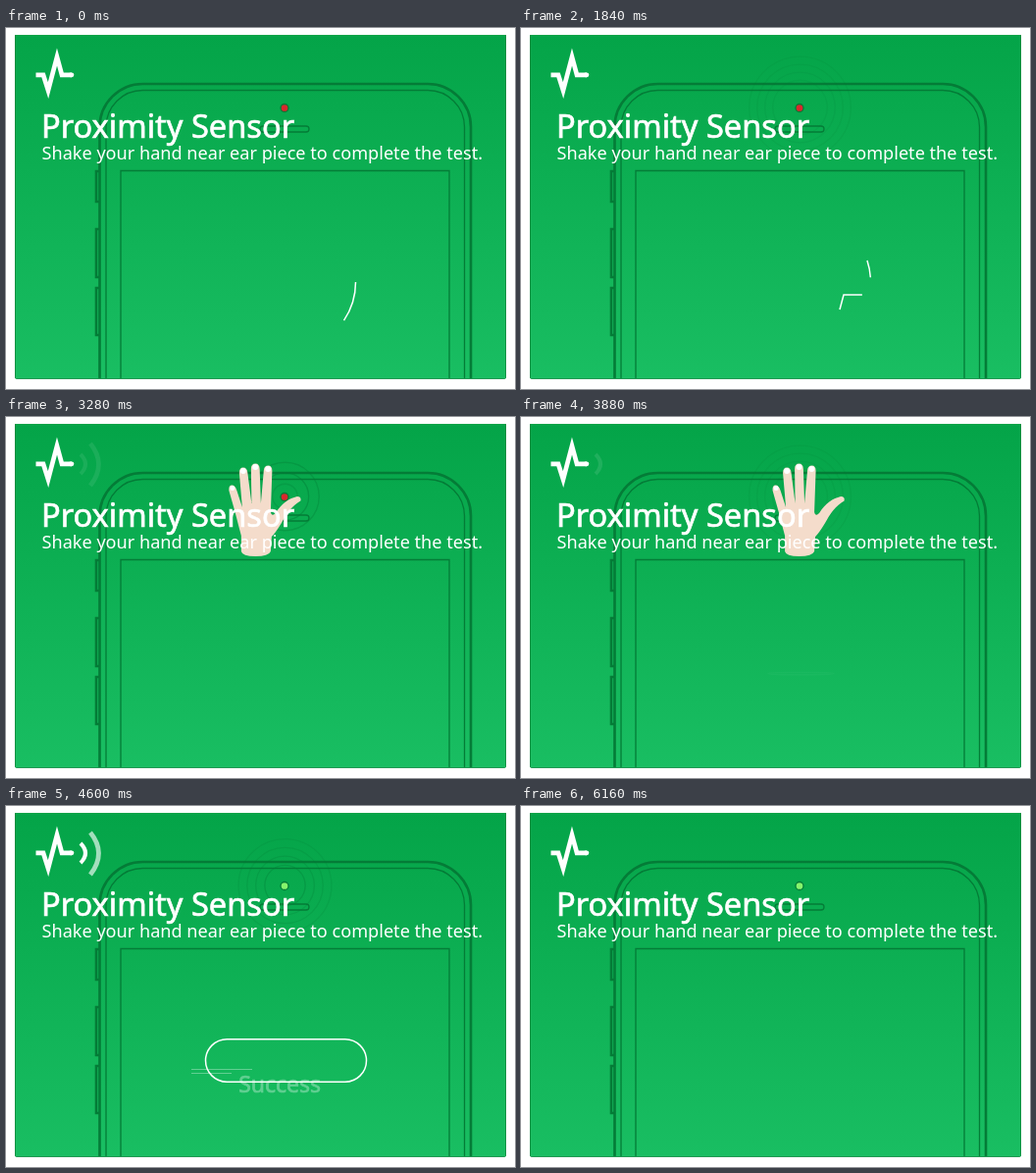
These frames come from a looping animation (519 by 368 pixels, 6.24 s). An HTML page:

```html
<!DOCTYPE html>
<html lang="en">
<head>
<meta charset="utf-8">
<title>Proximity Sensor</title>
<style>
  html, body { margin: 0; width: 100%; height: 100%; overflow: hidden; background: #fff; }
  svg { display: block; width: 519px; height: 368px; }
  text { font-family: "Noto Sans", "Open Sans", sans-serif; fill: #fff; }
  .medium { stroke: #fff; stroke-width: .7; }
  .line { fill: none; stroke: #fff; stroke-width: 1.5; }
  .phone { fill: none; stroke: #047c37; stroke-width: 1.3; }
  .phone .bold { stroke-width: 2.6; }
</style>
</head>
<body>
<svg viewBox="0 0 519 368">
  <defs>
    <linearGradient id="green" x2="0" y2="1">
      <stop stop-color="#04a448"/>
      <stop offset="1" stop-color="#19be62"/>
    </linearGradient>
  </defs>
  <rect x="9" y="7" width="501" height="350.5" rx="1" fill="url(#green)"/>
  <path d="M9.5 7V356.5L10.5 357.5H508.5L509.5 356.5V7" fill="none" stroke="#07873c" stroke-width=".8"/>

  <g class="phone">
    <path class="bold" d="M95.5 357V101A44 44 0 0 1 139.5 57H430A44 44 0 0 1 474 101V357"/>
    <path d="M102 357V101A37.5 37.5 0 0 1 139.5 63.5H430A37.5 37.5 0 0 1 467.5 101V357"/>
    <path d="M117 357V145.5H452V357"/>
    <path class="bold" d="M95 146H92V177H95M95 205H92V254H95M95 265H92V313H95"/>
    <rect x="259" y="100" width="50" height="6" rx="3"/>
    <circle id="light" cx="284" cy="81.5" r="4"/>
    <g id="rings"></g>
  </g>

  <circle id="arc" class="line" cx="286.5" cy="259" r="70" pathLength="360"/>
  <path id="beat" class="line" d="M218 272H252L258 290L272 212L277 272H304L313 240L321 302L329 272H355"/>

  <g id="hand">
    <path fill="#f4dccb" d="M276 137V121Q273 110 270 98L263.5 75Q263 69 267 69.5Q270 70 271.5 75L277 92L274 57Q274 51.5 278 51.5Q282 51.5 282.5 57L286.5 88L286 53Q286 47.5 290.5 47.5Q294.5 47.5 294.8 53L296 88L299 54Q299.5 49.5 303.5 49.5Q307.5 49.5 307.5 55L306 97Q307 102 311 98C317 88 325 83 333 81Q337.5 81 336.5 85.5C328 90 322 99 317 108Q311 118 307 122L306 137Q304 142 290.5 142Q277 142 276 137Z"/>
    <g fill="#fff">
      <circle cx="267" cy="72.5" r="2.5"/>
      <circle cx="278" cy="55" r="3"/>
      <circle cx="290.4" cy="51" r="3"/>
      <circle cx="303.3" cy="53" r="3"/>
    </g>
  </g>

  <g id="result">
    <rect id="button" class="line"/>
    <text id="success" class="medium" font-size="23" text-anchor="middle">Success</text>
  </g>
  <path id="streaks" class="line" style="stroke-width:1"/>

  <g fill="none" stroke="#fff" stroke-width="4.7">
    <path d="M30.5 47.8H38L43 63.5L52 29.5L57 47.8H67" stroke-miterlimit="10"/>
    <path d="M66 47.8H67" stroke-linecap="round"/>
    <path id="inner" stroke-width="4" d="M76 38Q86 48 76 58"/>
    <path id="outer" d="M86 27Q103 48 86 70"/>
  </g>
  <text class="medium" x="36" y="111.5" font-size="32.6">Proximity Sensor</text>
  <text x="36.5" y="134" font-size="18.12">Shake your hand near ear piece to complete the test.</text>
</svg>
<script>
const LOOP = 6240, STEP = 40;
const $ = id => document.getElementById(id);
const clamp = v => Math.max(0, Math.min(1, v));
const ramp = (t, from, to) => clamp((t - from) / (to - from));
const set = (el, attrs) => { for (const k in attrs) el.setAttribute(k, attrs[k]); };
const easeOut = u => 1 - (1 - u) ** 2;
const easeInOut = u => u * u * (3 - 2 * u);

const rings = [0, 1, 2, 3].map(() => {
  const ring = document.createElementNS("http://www.w3.org/2000/svg", "circle");
  set(ring, { cx: 284.5, cy: 81 });
  return $("rings").appendChild(ring);
});
const beatLength = $("beat").getTotalLength();

// Shows only the part of a stroke between two distances along it.
function trim(el, from, to, total) {
  from = Math.max(0, from);
  to = Math.min(total, to);
  set(el, {
    "stroke-dasharray": `0 ${from} ${Math.max(0, to - from)} ${total * 2}`,
    opacity: to > from ? 1 : 0
  });
}

function drawWaves(t) {
  const p = t % 1880, fade = t < 5600 ? 1 - ramp(p, 960, 1440) : 0;
  set($("inner"), { opacity: ramp(p, 80, 480) * fade });
  set($("outer"), { opacity: ramp(p, 600, 980) * fade });
}

function drawRings(t) {
  const age = t < 890 ? 0 : (t - 890) % 1010;
  const end = 1 - ramp(t, 5400, 5600);
  rings.forEach((ring, i) => {
    const born = 160 * i, u = ramp(age, born, 1010);
    set(ring, {
      r: 9 + (43 - 8 * i) * easeOut(u),
      opacity: u > 0 ? end * (0.12 + 0.6 * (1 - u) ** 2) * ramp(age, born, born + 120) : 0
    });
  });
}

function drawSearch(t) {
  const lap = 1035, p = ((t + 85) % lap) / lap;
  const swell = Math.sin(Math.PI * (p - 0.126) / 0.734) ** 2;
  const length = 4 + 12 * p + 80 * swell + (t < 950 ? 30 : 0);
  const head = t < 1985 ? 414 * p : 0;
  trim($("arc"), head - length, head, 360);

  const front = beatLength * (t / 1880) ** 0.9;
  trim($("beat"), front - Math.max(0, 78 - 0.0237 * t), front, beatLength);
}

function drawHand(t) {
  const x = -6 + 31 * Math.cos(2 * Math.PI * (t - 2300) / 2120);
  set($("hand"), {
    transform: `translate(${x} 0)`,
    opacity: ramp(t, 2000, 2240) * (1 - ramp(t, 4200, 4480))
  });
  set($("light"), { fill: t < 3800 ? "#d9272d" : "#86f56c" });
}

function drawResult(t) {
  const u = ramp(t, 3800, 4280);
  const w = 164 * (0.15 + 0.85 * easeOut(u)), h = 1 + 42.5 * u * u;
  set($("button"), {
    x: 285.5 - w / 2, y: 262 - 2.5 * u - h / 2,
    width: w, height: h, rx: w / 2, ry: h / 2, opacity: u * u
  });
  set($("button"), { rx: Math.min(w / 2, 21.75) });

  const rise = ramp(t, 4480, 4960);
  set($("success"), {
    x: 278 + 7.5 * easeInOut(rise),
    y: 297 - 29 * easeInOut(rise),
    opacity: 1.3 * rise
  });
  set($("result"), { opacity: ramp(t, 6160, 6000) });

  const x = 189 + (t - 4600) * 0.3;
  set($("streaks"), {
    d: `M${x} 268.5h62M${x} 272.5h41`,
    opacity: 0.33 * ramp(t, 4480, 4600) * (1 - ramp(t, 4900, 5160))
  });
}

function frame(now) {
  const t = Math.min(6160, Math.floor(now % LOOP / STEP) * STEP);
  drawWaves(t);
  drawRings(t);
  drawSearch(t);
  drawHand(t);
  drawResult(t);
  requestAnimationFrame(frame);
}
frame(0);
</script>
</body>
</html>
```
